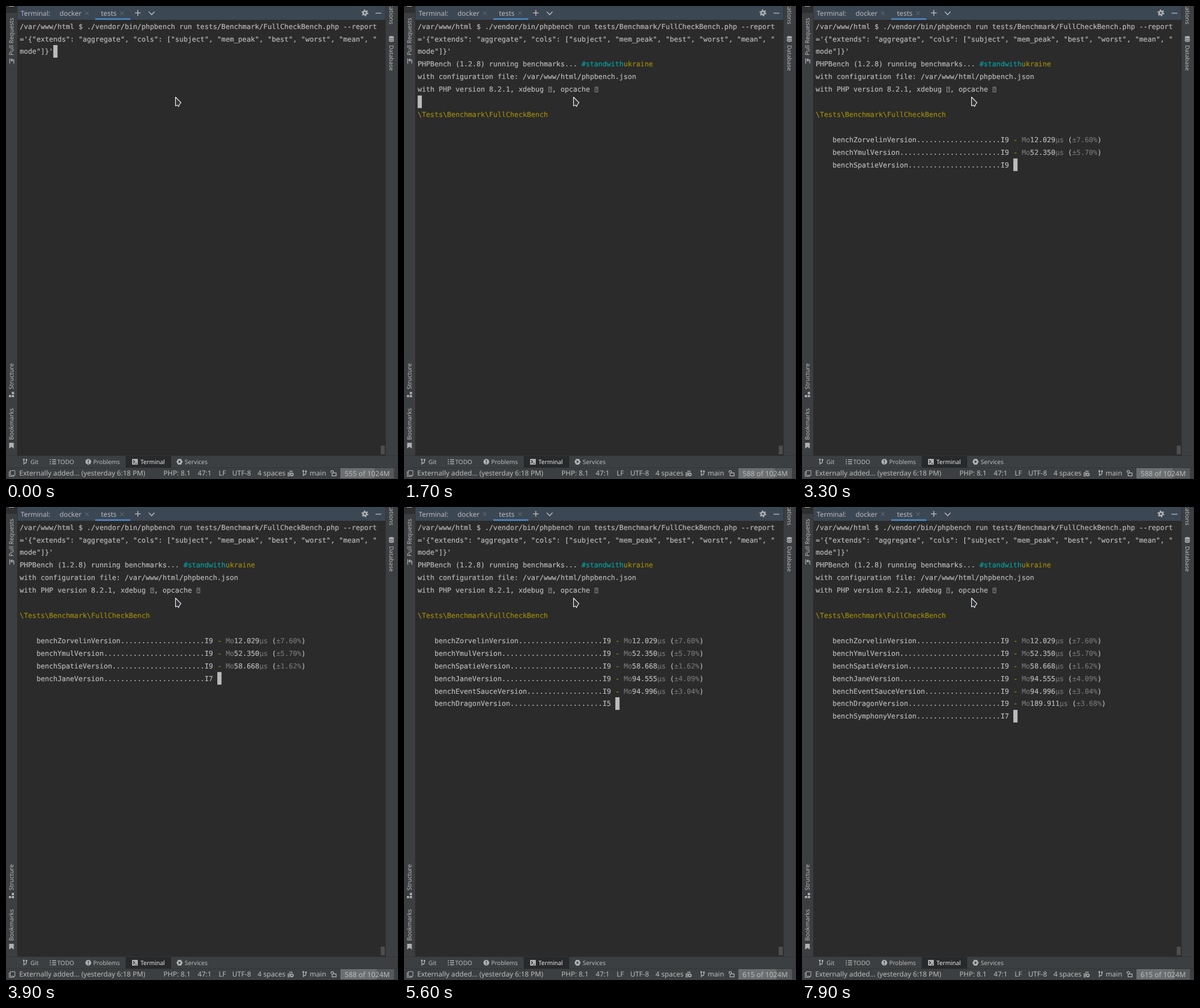
Write an HTML page that moves like this. It is 681x823 px and loops after 8000 ms.

```html
<!DOCTYPE html>
<html lang="en">
<head>
<meta charset="utf-8">
<title>Terminal benchmark</title>
<style>
  html, body { margin: 0; width: 100%; height: 100%; overflow: hidden; background: #3c3f41; }
  svg { display: block; width: 681px; height: 823px; }
  text { color: #bbb; white-space: pre; text-rendering: geometricPrecision; }
  text, tspan { fill: currentColor; }
  .ui { font: 12.1px "Noto Sans", sans-serif; }
  .small { font: 10.4px "Noto Sans", sans-serif; }
  .mono { font: 12.137px "DejaVu Sans Mono", monospace; stroke-width: .18; }
  .mono text, .mono tspan { stroke: currentColor; }
  .line { fill: none; stroke: #afb1b3; stroke-width: 1.3; }
  .solid { fill: #afb1b3; }
  .cyan { color: #00a3a3; }
  .yellow { color: #a08c08; }
  .dim { color: #757575; }
  .close { fill: none; stroke: #6f7a84; }
</style>
</head>
<body>
<svg viewBox="0 0 681 823">
  <!-- panels -->
  <rect width="681" height="823" fill="#3c3f41"/>
  <rect x="20" width="639" height="782" fill="#2b2b2b"/>
  <rect x="20" width="639" height="24" fill="#3c4754"/>
  <rect x="155" y="21.4" width="61" height="2.7" fill="#4a88c7"/>
  <rect width="19" height="12" fill="#2d2f30"/>
  <path d="M5 .5H14" stroke="#afb1b3"/>
  <path d="M19.5 0V782M659.5 0V782M680.5 0V803M0 782.5H681M0 803.5H681" stroke="#323232"/>
  <rect x="651" y="765" width="7" height="15" fill="#4d4d4d"/>

  <!-- header -->
  <g class="ui">
    <text x="25.5" y="16.5" style="font-size:11.8px">Terminal:</text>
    <text x="93" y="16.5" style="font-size:11.9px">docker</text>
    <text x="165" y="16.5">tests</text>
  </g>
  <path class="close" d="M137.500 9.500l6 6m0-6l-6 6M198.500 9.500l6 6m0-6l-6 6"/>
  <path class="line" style="stroke-width:1.6" d="M224 12H234M229 7V17M248 10L253 15L258 10M642 12.500H652"/>
  <circle class="line" cx="623.5" cy="12" r="3" style="stroke-width:2.600"/>
  <circle class="line" cx="623.5" cy="12" r="5" style="stroke-width:2;stroke-dasharray:2.400 2.836"/>

  <!-- side bars -->
  <g class="small">
    <text transform="translate(13 86) rotate(-90)">Pull Requests</text>
    <text transform="translate(13 667) rotate(-90)">Structure</text>
    <text transform="translate(13 755) rotate(-90)">Bookmarks</text>
    <text transform="translate(666 32) rotate(90)" text-anchor="end">Notifications</text>
    <text transform="translate(666 68) rotate(90)" style="font-size:10.1px">Database</text>
  </g>
  <path class="line" d="M6.500 91V100M13.500 100V94H9M11 91.500L8.500 94L11 96.500"/>
  <path class="solid" d="M10 671.500h4v4h-4zM5 677h4v3.500h-4zM10 677h4v3.500h-4zM5.500 760h8v10l-4-3l-4 3z"/>
  <path class="solid" d="M665 54.500a4.500 2.200 0 0 1 9 0v6a4.500 2.200 0 0 1-9 0z"/>
  <path d="M665 55a4.500 2 0 0 0 9 0M665 58a4.500 2 0 0 0 9 0M665 61a4.500 2 0 0 0 9 0" fill="none" stroke="#3c3f41" stroke-width=".9"/>

  <!-- tool buttons -->
  <rect x="208" y="783" width="79" height="20" fill="#27292a"/>
  <g class="small">
    <text x="42.5" y="796.7">Git</text>
    <text x="89" y="796.7">TODO</text>
    <text x="151.500" y="796.7">Problems</text>
    <text x="233.500" y="796.7" style="color:#eee">Terminal</text>
    <text x="310.500" y="796.7">Services</text>
  </g>
  <g id="branch">
    <path class="line" d="M31 789V798M31 795.500H33Q35.500 795.500 35.500 792.500V790"/>
    <circle class="solid" cx="31" cy="789" r="1.600"/><circle class="solid" cx="35.500" cy="789.500" r="1.600"/>
  </g>
  <path class="line" d="M76 789.500H78M80 789.500H87M76 793H78M80 793H87M76 796.500H78M80 796.500H87"/>
  <circle class="solid" cx="143" cy="793" r="5"/>
  <path d="M143 789.800V793.800M143 794.900V796.400" stroke="#3c3f41" stroke-width="1.500"/>
  <rect class="solid" x="219" y="788" width="10" height="10"/>
  <path d="M221 790.500l2.500 2.500l-2.500 2.500M224.500 796h3" fill="none" stroke="#27292a" stroke-width="1.200"/>
  <path class="solid" d="M299 788h5l3 5l-3 5h-5l-3-5z"/>
  <path d="M300 790.500l4 2.500l-4 2.500z" fill="#3c3f41"/>

  <!-- status bar -->
  <path class="line" style="stroke-width:1" d="M7.500 808.500H15.500V816.500H7.500ZM7.500 810.500H5.500V818.500H13.500V816.500"/>
  <g class="ui">
    <text x="23" y="817.3">Externally added... (yesterday 6:18 PM)</text>
    <text x="273.500" y="817.3">PHP: 8.1</text>
    <text x="333" y="817.3">47:1</text>
    <text x="369.500" y="817.3">LF</text>
    <text x="393" y="817.3">UTF-8</text>
    <text x="437" y="817.3">4 spaces</text>
    <text x="527.500" y="817.3">main</text>
  </g>
  <path class="line" d="M489 812.500H494M489 815H493M489 817.500H493M492 809.500H498"/>
  <circle class="line" cx="496.500" cy="815" r="2.300" style="stroke-width:1.800"/>
  <use href="#branch" x="485.500" y="20"/>
  <rect class="line" x="566.500" y="812.500" width="7" height="5"/>
  <path class="line" d="M569 812V810.500a2.200 2.200 0 0 0-4.400 0V812"/>
  <rect x="581" y="804" width="93" height="18" fill="#56595b"/>
  <rect id="memoryBar" x="581" y="804" height="18" fill="#6c6f71"/>
  <text id="memoryText" class="ui" x="627.500" y="817.5" text-anchor="middle" style="font-size:12.3px"></text>

  <!-- terminal -->
  <rect id="cursor" width="7.3" height="21.9" fill="#bbb"/>
  <g id="terminal" class="mono"></g>
  <path d="M294.500 158.500V173.700L297.800 172.500L299.800 175L301.500 171L304 168.200Z" fill="#31363b" stroke="#fff" stroke-width="1.100" stroke-linejoin="round"/>
</svg>
<script>
const DURATION = 8000, LEFT = 23.7, COL = 7.307, PITCH = 21.92, FIRST_BENCH_ROW = 9;
const $ = id => document.getElementById(id);
const terminal = $('terminal'), cursor = $('cursor');

function make(tag, attrs, parent, content = '') {
  const el = document.createElementNS('http://www.w3.org/2000/svg', tag);
  for (const key in attrs) el.setAttribute(key, attrs[key]);
  el.textContent = content;
  return parent.appendChild(el);
}
const show = (el, on) => el.setAttribute('visibility', on ? 'visible' : 'hidden');

// Each part is plain text or [class, text].
function addLine(row, parts, parent = terminal, col = 0) {
  const line = make('text', { x: LEFT + col * COL, y: 39.6 + row * PITCH }, parent);
  for (const part of parts) {
    const [name, content] = Array.isArray(part) ? part : ['', part];
    make('tspan', { class: name }, line, content);
  }
  return line;
}

addLine(0, ['/var/www/html $ ./vendor/bin/phpbench run tests/Benchmark/FullCheckBench.php --report']);
addLine(1, ['=\'{"extends": "aggregate", "cols": ["subject", "mem_peak", "best", "worst", "mean", "']);
addLine(2, ['mode"]}\'']);

const header = make('g', {}, terminal);
addLine(3, ['PHPBench (1.2.8) running benchmarks... ', ['cyan', '#standwith'], ['yellow', 'ukraine']], header);
addLine(4, ['with configuration file: /var/www/html/phpbench.json'], header);
addLine(5, ['with PHP version 8.2.1, xdebug  , opcache  '], header);
addLine(7, [['yellow', '\\Tests\\Benchmark\\FullCheckBench']], header);
// Placeholder boxes for glyphs the terminal font lacks.
for (const col of [31, 42]) {
  const x = LEFT + col * COL + 1.2;
  make('path', {
    d: `M${x} 141h5v8.500h-5zM${x + 1.5} 143.500q1-1.500 2 0q0 1-1 1.500v1m0 1v1`,
    fill: 'none', stroke: '#aaa', 'stroke-width': .8
  }, header);
}

// name, mode time, deviation, [tenth of a second, iteration] steps
const benches = [
  ['Zorvelin', '12.029', '7.60', [[18, 0], [19, 3], [20, 7]]],
  ['Ymul', '52.350', '5.70', [[21, 0], [22, 2], [23, 3], [24, 5]]],
  ['Spatie', '58.668', '1.62', [[27, 0], [28, 1], [29, 3], [30, 4], [31, 6], [32, 7], [33, 9]]],
  ['Jane', '94.555', '4.09', [[34, 0], [36, 2], [37, 4], [38, 5], [39, 7], [41, 9]]],
  ['EventSauce', '94.996', '3.04', [[42, 0], [43, 2], [44, 3], [46, 6], [47, 7], [48, 9]]],
  ['Dragon', '189.911', '3.68', [[49, 0], [52, 2], [53, 3], [54, 4], [56, 5], [57, 6], [58, 7], [59, 8], [61, 9]]],
  ['Symphony', '', '', [[63, 0], [64, 1], [68, 2], [69, 3], [73, 4], [74, 5], [78, 6], [79, 7]]]
].map(([name, mode, deviation, steps], i) => {
  const row = FIRST_BENCH_ROW + i;
  const label = addLine(row, [`bench${name}Version`.padEnd(40, '.') + 'I'], terminal, 4);
  const count = make('tspan', {}, label);
  const result = addLine(row, [['yellow', '- '], ['dim', 'Mo'], mode, ['dim', 'µs '], '(', ['dim', `±${deviation}%`], ')'], terminal, 47);
  return { label, count, result, steps };
});

function placeCursor(row, col, on = true) {
  cursor.setAttribute('x', LEFT + col * COL);
  cursor.setAttribute('y', 24.2 + row * PITCH);
  show(cursor, on);
}

function render(t) {
  const tick = Math.floor(t / 100);
  const active = benches.findLastIndex(b => b.steps[0][0] <= tick);
  show(header, tick >= 17);

  benches.forEach((bench, i) => {
    show(bench.label, i <= active);
    show(bench.result, i < active);
    const step = bench.steps.findLast(s => s[0] <= tick);
    bench.count.textContent = i < active ? 9 : step ? step[1] : 0;
  });

  if (active >= 0) placeCursor(FIRST_BENCH_ROW + active, 47);
  else if (tick >= 17) placeCursor(6, 0);
  else if (tick >= 16) placeCursor(3, 0);
  else placeCursor(2, 8, tick < 2 || (tick >= 10 && tick < 14));

  const used = tick < 2 ? 555 : tick < 52 ? 588 : 615;
  $('memoryBar').setAttribute('width', used * .107);
  $('memoryText').textContent = `${used} of 1024M`;
}

const start = performance.now();
function frame() {
  render((performance.now() - start) % DURATION);
  requestAnimationFrame(frame);
}
frame();
</script>
</body>
</html>
```
